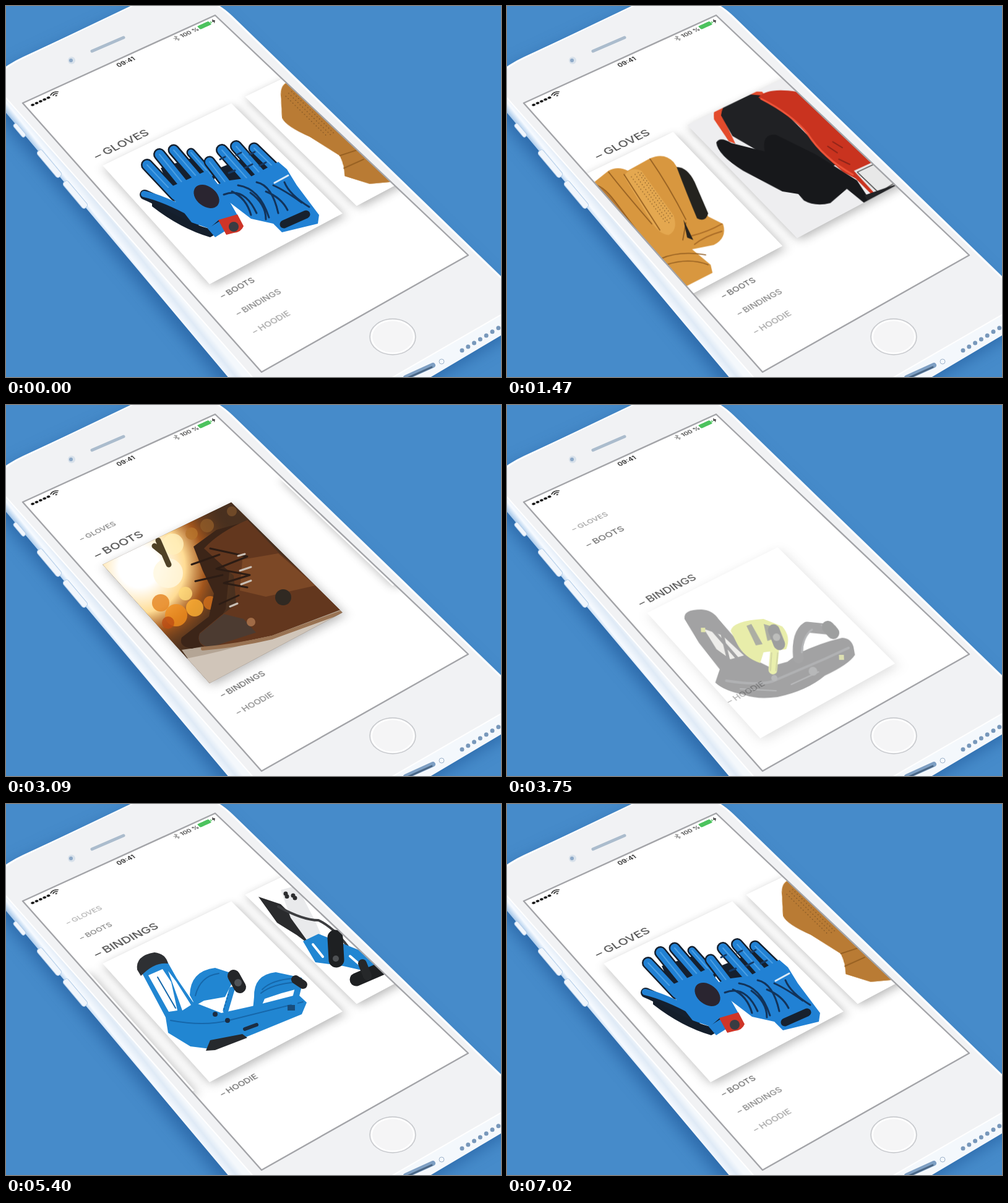
Recreate the animation shown at these times as an HTML page. Size 800 by 600 pixels, loop 7050 ms.

```html
<!DOCTYPE html>
<html lang="en">
<head>
<meta charset="utf-8">
<title>Winter gear carousel</title>
<style>
html, body { margin: 0; width: 100%; height: 100%; overflow: hidden; background: #468bca; }
svg, div { position: absolute; left: 0; top: 0; }
svg { width: 800px; height: 600px; overflow: visible; transform-origin: 0 0; }
#stage, #screen { width: 800px; height: 600px; overflow: hidden; }
#screen { background: #fff; clip-path: polygon(27px 157px, 338px 15px, 747px 403px, 413px 592px); }
.card { width: 243px; height: 297px; transform-origin: 0 0; box-shadow: 0 6px 17px rgba(0,0,0,.29); }
text { font-family: Inter, Roboto, sans-serif; font-weight: 500; }
</style>
</head>
<body>
<div id="stage">
  <svg>
    <defs>
      <linearGradient id="side" gradientUnits="userSpaceOnUse" x1="163" y1="375" x2="188" y2="355">
        <stop offset="0" stop-color="#a9c9ea"/><stop offset=".3" stop-color="#f6faff"/>
        <stop offset=".7" stop-color="#dfeaf6"/><stop offset="1" stop-color="#f4f8fc"/>
      </linearGradient>
    </defs>
    <path d="M-20 112Q6 92 28 82L214 -4H338Q352 2 372 22L830 466V515L680 604H362L-20 149Z" fill="url(#side)" style="filter:drop-shadow(-8px 12px 12px #1d559699)"/>
    <g fill="#f1f6fc" stroke="#b4cde8">
      <rect x="-13" y="-3.5" width="26" height="7" rx="3" transform="translate(22 201)rotate(50)"/>
      <rect x="-27" y="-5" width="54" height="10" rx="4" transform="translate(70 255)rotate(50)"/>
      <rect x="-27" y="-5" width="54" height="10" rx="4" transform="translate(112 305)rotate(50)"/>
    </g>
    <path d="M-20 116Q6 94 28 84L212 -4H336Q350 3 370 23L830 469V482L612 608H405L-20 126Z" fill="#f1f2f4" stroke="#fff" stroke-width="2"/>
    <path d="M139 73L190 51" stroke="#abbccd" stroke-width="5" stroke-linecap="round"/>
    <circle cx="106" cy="88" r="6" fill="#d8e1ea"/><circle cx="105" cy="88" r="3" fill="#8da9c8"/>
    <ellipse cx="625" cy="535" rx="37" ry="29" fill="#f5f5f6" stroke="#c5c7cb" stroke-width="1.5"/>
    <ellipse cx="625" cy="535" rx="34" ry="26.5" fill="none" stroke="#fff" stroke-width="2"/>
    <path d="M646 601L690 581" stroke="#7e9fc3" stroke-width="8" stroke-linecap="round"/>
    <path d="M650 601L688 584" stroke="#4a6684" stroke-width="3" stroke-linecap="round"/>
    <circle cx="704" cy="575" r="4" fill="none" stroke="#9fb4cb"/>
    <path d="M737 557L802 517" stroke="#7898bb" stroke-width="7" stroke-linecap="round" stroke-dasharray="0 11.5"/>
  </svg>
  <div id="screen"></div>
  <svg><path d="M27 157L338 15L747 403L413 592Z" fill="none" stroke="#a3a4a8" stroke-width="2.4" stroke-linejoin="round"/></svg>
</div>
<script>
const LOOP = 7050, LEFT = 31, TOP = 195, CARD_W = 243, CARD_H = 297, PITCH = 270;
const MIDDLE = TOP + CARD_H / 2;
const screen = document.getElementById('screen');

// Perspective from the flat 375 x 667 screen to the stage.
const plane = new DOMMatrix([
  329.54, -141.18, 0, .05486, 329.81, 354.46, 0, -.13605, 0, 0, 1, 0, 27, 157, 0, 1
]).scale(1 / 375, 1 / 667);
const flat = plane.inverse();
const project = (x, y) => {
  const p = plane.transformPoint(new DOMPoint(x, y));
  return `${p.x / p.w}px ${p.y / p.w}px`;
};

const fill = (c, d) => `<path fill="${c}" d="${d}"/>`;
const line = (c, w, d, more = '') =>
  `<path fill="none" stroke="${c}" stroke-width="${w}" stroke-linecap="round" stroke-linejoin="round" d="${d}" ${more}/>`;
const dot = (c, x, y, r, more = '') => `<circle fill="${c}" cx="${x}" cy="${y}" r="${r}" ${more}/>`;
const finger = (w, d) => line('#15202f', w + 5, d) + line('#2181d4', w, d) + line('#4a9fe4', 2, d);

const blueGloves =
  line('#15202f', 16, 'M224 305Q255 318 305 350') + line('#2181d4', 10, 'M223 304Q255 311 305 338') +
  fill('#15202f', 'M250 262L300 246L340 270L330 300L270 306Z') +
  finger(15, 'M228 257L274 306') + finger(15, 'M248 240L294 297') +
  finger(14, 'M271 233L315 284') + finger(10, 'M299 237L330 272') +
  fill('#2181d4', 'M258 296L290 282L325 266L352 300L375 340L340 364L300 350Z') +
  fill('#141e2b', 'M236 316Q290 350 328 360L344 346L352 362L330 374Q282 360 236 324Z') +
  '<ellipse cx="324" cy="308" rx="23" ry="16" transform="rotate(38 324 308)" fill="#2a2530"/>' +
  fill('#2181d4', 'M326 360L345 348L354 364L338 374Z') +
  fill('#cf3528', 'M343 346L374 337L384 356Q380 366 368 367L356 370Z') + dot('#3a3c42', 368, 357, 8) +
  fill('#15202f', 'M345 262L410 235L445 262L420 290L360 300Z') +
  finger(14, 'M329 252L366 300') + finger(15, 'M349 233L394 284') +
  finger(15, 'M372 227L417 278') + finger(14, 'M401 230L440 268') +
  fill('#2181d4', 'M330 292L362 282L392 278L440 252L454 264L470 290L506 338L504 352L446 366L432 352L396 344L362 318Z') +
  line('#12335a', 3, 'M352 305Q385 292 405 335M375 290Q410 295 425 342M405 285Q430 290 440 335M432 290Q450 298 478 318M395 302Q420 320 420 345M450 285Q458 305 490 325M365 300Q388 310 396 338M420 300Q445 310 455 330') +
  line('#143a66', 3, 'M346 248L354 244M372 241L380 237M394 240L402 236M386 262L398 256M410 258L420 253M360 270L370 266') +
  line('#17212e', 13, 'M449 353L485 337') + line('#dceaf7', 3, 'M434 286L456 274');

const tanGloves =
  fill('#d8973f', 'M126 314Q126 290 140 286L165 266Q180 258 196 266L232 246Q255 236 270 252L292 285L326 340L350 352Q357 375 335 386L300 393L330 418L333 431L292 452L250 456L212 443Q214 425 208 409L165 378L124 346Z') +
  fill('#b97b34', 'M126 314Q126 292 138 288Q155 288 175 315L235 395L292 452L250 456L212 443Q214 425 208 409L165 378Q128 360 124 346Z') +
  fill('#e4a850', 'M190 275Q200 258 218 266L270 338Q278 362 262 370Q245 368 232 345Z') +
  fill('#24231f', 'M275 260Q292 260 304 284L326 335Q322 350 308 343Q292 305 275 260Z') +
  line('#8f5a1e', 1.6, 'M165 268Q190 300 235 352M138 288Q155 288 175 315L235 395M232 247Q262 290 290 345M190 272L248 362M290 350L285 378M250 408Q280 395 322 402M258 418Q295 406 326 418M208 409L235 400M212 430L245 415') +
  line('#69451d', 1.5, 'M202 276L258 350M208 272L264 352M213 269L267 347M218 270L268 340M134 310L190 375M139 305L198 375M144 302L204 373', 'stroke-dasharray="0 5"') +
  line('#a86a25', 2, 'M300 371Q325 365 348 352M304 385Q320 372 348 364') +
  fill('#27241f', 'M286 345L302 378L292 374Z');

const redMitts =
  fill('#e34b2c', 'M217 250Q215 210 262 206L292 207L300 218Q240 208 232 250L248 288L238 284Z') +
  fill('#202124', 'M228 244Q232 214 272 211L302 214L400 320L360 340L290 304L244 276Z') +
  fill('#17181b', 'M219 286Q225 276 242 287L292 300Q288 272 310 274L370 305L430 345L452 382L444 384L414 358L388 380Q365 386 348 376L340 366L316 362L258 330Q220 305 219 286Z') +
  fill('#c9331f', 'M286 216Q300 200 345 207L392 222Q422 240 440 272L462 300L504 346L458 374L428 342L410 332Q375 302 355 268Q335 245 286 216Z') +
  line('#f0553a', 3, 'M290 218Q335 242 358 272Q380 310 424 336') +
  line('#8d2419', 2, 'M388 292L402 302M396 285L410 294M404 312L420 320') +
  fill('#e8e8e8', 'M426 330L478 306L503 343L460 370Z') +
  line('#303030', 1.2, 'M431 332L476 311L498 342L462 364Z') +
  fill('#222326', 'M440 368L503 346L504 353L448 384Z');

const blackGlove =
  fill('#202124', 'M408 134L446 112L590 245L610 262L560 266L520 232L465 184Z') +
  fill('#141518', 'M424 180Q445 174 485 186L525 212L596 255Q590 268 560 266L532 246Q470 230 448 204Z') +
  line('#46474c', 3, 'M425 138L480 190M532 238L558 226M538 250L574 242');

const boots =
  fill('#49301f', 'M140 260L364 150L550 340L329 460Z') +
  fill('url(#glow)', 'M140 260L364 150L550 340L329 460Z') +
  [[270, 225, 17, '#fff0bd'], [262, 272, 24, '#fff8df'], [300, 208, 10, '#b7742c'], [325, 195, 11, '#8d5a28'], [250, 320, 14, '#e58320'], [275, 340, 18, '#f08e1d'], [305, 328, 14, '#ffb234'], [290, 305, 11, '#ffd979'], [262, 352, 10, '#bd4c13'], [330, 320, 11, '#d4701a'], [365, 172, 8, '#79502b']]
    .map(([x, y, r, c]) => dot(c, x, y, r, 'opacity=".8"')).join('') +
  line('#4f4126', 9, 'M246 219L263 258M240 228L255 240') +
  fill('#b4a595', 'M284 396L340 388L548 320V345L329 460Z') +
  fill('#d0c5b9', 'M292 410Q400 390 548 330L500 372L329 450Z') +
  fill('#3c2518', 'M303 229L340 202L383 190L362 260L355 330L322 388L300 394Q278 390 284 376L328 342L336 305L318 268Z') +
  fill('#63371e', 'M320 232Q345 205 390 186L440 238L516 302L541 331L430 373L330 394Q306 388 313 369L348 340L372 322L368 276Z') +
  fill('#4c3b31', 'M313 370L352 338L384 346L404 368L330 392Q307 388 313 370Z') +
  fill('#7c4826', 'M382 250L440 240L500 292L420 310L378 300Z') +
  line('#997353', 6, 'M318 394Q370 390 430 376L540 336') +
  line('#2c1c14', 3, 'M330 232L390 245L340 265L394 275L352 288L390 295M300 258L345 242M306 285L350 275M345 322L376 308') +
  line('#c9bfb5', 3, 'M375 244L386 241M378 268L396 262M380 290L396 284M362 326L374 321') +
  dot('#302922', 448, 311, 13) + dot('#a06b46', 396, 351, 7);

const blackBinding =
  fill('#222324', 'M176 284Q174 269 204 269Q222 270 231 284L264 323L290 350L310 360L340 352L360 338Q395 322 430 314Q444 314 448 328L450 341Q440 356 400 374Q370 398 322 408Q290 412 270 405Q235 398 222 385L230 364L198 322Z') +
  fill('#d6d5ce', 'M207 300L236 310L270 342L248 348L226 332Z') +
  line('#222324', 5, 'M216 296L262 350M236 308L245 350') +
  fill('#c8d536', 'M250 303Q254 287 304 284L334 296Q348 312 339 332L302 337L296 354Q270 345 260 324Z') +
  fill('#3b3f24', 'M276 295L284 292L301 324L290 326ZM304 292L324 298L329 312L309 319Z') +
  line('#cbd83c', 14, 'M320 334L316 365') + line('#929d24', 2, 'M315 338L312 366M325 338L321 366') +
  line('#17181a', 19, 'M320 302L328 324') + dot('#60635e', 324, 313, 6) +
  line('#292a2c', 17, 'M358 346Q356 308 374 297L414 301') + line('#505257', 3, 'M364 337Q367 311 382 301M398 294L416 307') +
  line('#1a1b1c', 20, 'M408 297L416 306') +
  line('#44464a', 4, 'M240 382Q290 390 315 383L402 347L440 330') +
  line('#55575b', 2, 'M262 395L320 398M345 388L390 368') +
  dot('#55575a', 318, 378, 5) + dot('#55575a', 381, 367, 7) +
  '<rect x="424" y="341" width="8" height="8" fill="#aeb647"/><rect x="202" y="298" width="7" height="7" fill="#b9c43b"/>';

const blueBinding =
  fill('#2186d2', 'M218 270L258 250L276 282L302 320L348 338L402 326L472 308L486 321L478 340L400 372L338 397L298 392L262 370L258 345Z') +
  fill('#2e3033', 'M212 268Q209 245 240 240Q258 242 262 258Q240 255 218 278Z') +
  fill('#fff', 'M230 277L253 267L267 288L277 334L263 336ZM262 270L275 287L299 325L285 334Z') +
  fill('#2186d2', 'M297 309Q298 270 338 265L372 276L354 312L320 318L306 326Z') +
  line('#1667aa', 2, 'M306 310Q314 278 344 274M266 350Q320 360 360 350L480 320M245 280L274 330') +
  line('#2186d2', 9, 'M365 300L355 334') + line('#1667aa', 2, 'M359 308L352 332', 'stroke-dasharray="1 5"') +
  line('#242629', 20, 'M368 278L378 296') + dot('#505459', 375, 289, 6) +
  fill('#2186d2', 'M401 312Q400 276 436 272L478 281L482 296L445 306L418 315L410 334L399 332Z') +
  line('#1667aa', 2, 'M412 306Q430 291 470 288M414 300Q430 284 466 282') +
  line('#2186d2', 10, 'M472 298L466 322') + line('#242629', 14, 'M468 284L480 292') +
  fill('#26292d', 'M323 399L330 382L382 372L390 378L338 398Z') +
  line('#1c2d42', 6, 'M386 364L405 357') + dot('#1c2d42', 338, 340, 4) + dot('#1c2d42', 358, 350, 4) +
  '<rect x="455" y="325" width="12" height="9" fill="#184c7a"/>';

const whiteBinding =
  fill('#2a2b2d', 'M408 150L444 162L472 190L494 230L470 212L438 192Z') +
  fill('#e9eaec', 'M444 139L470 132L500 190L512 218L486 220L460 184Z') +
  line('#2b2c2e', 7, 'M452 145L456 154M464 148L470 156', 'stroke-dasharray="0 5"') +
  line('#3c3d40', 4, 'M440 166Q480 188 505 188Q530 200 552 230') +
  fill('#2186d2', 'M480 222L505 210L580 240L620 262L606 276L545 262L500 256Z') +
  line('#fff', 4, 'M496 227L512 247M556 246L572 260') +
  line('#1e2022', 25, 'M532 216L534 252') + dot('#4e5154', 533, 250, 5) +
  line('#1e2022', 21, 'M566 284L610 265') + line('#26282a', 14, 'M576 258L584 278');

// Each card: artwork, background, and the screen x at which the artwork is drawn.
const sections = [
  ['GLOVES', [[blueGloves, '#fff', 31], [tanGloves, '#fff', -82], [redMitts, '#eeeef0', 36], [blackGlove, '#eeeef0', 307]]],
  ['BOOTS', [[boots, '#49301f', 31], ['', '#fff', 301]]],
  ['BINDINGS', [[blackBinding, '#fff', -9], [blueBinding, '#fff', 31], [whiteBinding, '#fff', 301]]],
  ['HOODIE', []]
];

function add(tag, html = '') {
  screen.insertAdjacentHTML('beforeend', `<${tag}>${html}</${tag}>`);
  return screen.lastElementChild;
}

const glow = '<defs><radialGradient id="glow" gradientUnits="userSpaceOnUse" cx="215" cy="262" r="165"><stop offset=".2" stop-color="#fff"/><stop offset=".45" stop-color="#ffdc94"/><stop offset=".65" stop-color="#b85f1c" stop-opacity=".8"/><stop offset="1" stop-color="#3a291e" stop-opacity="0"/></radialGradient></defs>';
const status = '<g font-size="12" text-anchor="middle" fill="#222">' +
  [0, 1, 2, 3, 4].map(i => dot('#111', 11 + i * 7.3, 13, 2.8)).join('') +
  line('#222', 1.8, 'M46 10Q53 4 60 10M49 13Q53 9 57 13') + dot('#222', 53, 16, 1.6) +
  '<text x="188" y="17.5" font-size="12.5" style="font-weight:600">09:41</text><text x="315" y="16">100 %</text>' +
  line('#888', 1.2, 'M285 9L292 15L289 18V5L292 8L285 14') +
  '<rect x="334" y="6" width="23" height="10" rx="2" fill="#4cc35e"/><rect x="358" y="9" width="2" height="4" fill="#4cc35e"/>' +
  fill('#222', 'M366 5L361 12H364L362 17L368 10H365Z') + '</g>';
const overlay = add('svg', glow + status + sections.map(s => `<text class="label" x="${LEFT}">– ${s[0]}</text>`).join(''));
overlay.style.transform = plane;
const labels = overlay.querySelectorAll('.label');

const cards = sections.flatMap(([, list], section) => list.map(([art, color, drawnAt], index) => {
  const box = add('div'), image = add('svg', art);
  box.className = 'card';
  box.style.background = color;
  return { section, index, drawnAt, box, image };
}));

// Steps are [start, end, target]; each eases out from the value before it.
const track = (t, steps) => steps.reduce((v, [start, end, to]) => {
  const left = 1 - Math.min(1, Math.max(0, (t - start) / (end - start)));
  return v + (to - v) * (1 - left ** 3);
}, 0);

// Pictures grow inside their frame as the card leaves the centre.
const zoomAt = x => 1 + .16 * Math.min(1, Math.abs(x - LEFT) / PITCH);

function labelY(d) {
  if (d < -1) return 132 + 42 * (d + 1);
  if (d < 0) return 179 + 47 * d;
  return d < 1 ? 179 + 347 * d : 526 + 40.5 * (d - 1);
}

function draw(now) {
  const t = now % LOOP;
  const current = track(t, [[2250, 3000, 1], [3550, 4250, 2], [5800, 6700, 0]]);
  const spread = 220 * track(t, [[2250, 2600, 1], [2900, 3500, 0], [3550, 3800, 1], [3950, 4400, 0], [5800, 6100, 1], [6300, 6950, 0]]);
  const scroll = [
    track(t, [[300, 1150, 1], [1323, 2209, 2], [3500, 3501, 0]]), 0,
    track(t, [[4425, 5280, 1]])
  ];
  labels.forEach((label, i) => {
    const d = i - current;
    label.setAttribute('y', labelY(d));
    label.setAttribute('font-size', 13.7 + 7 * Math.max(0, 1 - Math.abs(d)));
    label.setAttribute('fill-opacity', d > 0 ? .7 - .11 * d : .68 + .18 * d);
  });
  for (const { section, index, drawnAt, box, image } of cards) {
    const d = section - current, s = scroll[section];
    const x = LEFT + (index - s) * PITCH + spread * Math.sign(index - Math.round(s));
    const dy = labelY(d) - 179;
    box.style.opacity = image.style.opacity = Math.max(0, 1 - 1.6 * Math.abs(d));
    box.style.transform = plane.translate(x, TOP + dy);

    const zoom = zoomAt(x) / zoomAt(drawnAt), center = drawnAt + CARD_W / 2;
    image.style.transform = plane.translate(x + CARD_W / 2, MIDDLE + dy)
      .scale(zoom, zoom).translate(-center, -MIDDLE).multiply(flat);
    const w = CARD_W / 2 / zoom, h = CARD_H / 2 / zoom;
    const corners = [[-w, -h], [w, -h], [w, h], [-w, h]].map(([a, b]) => project(center + a, MIDDLE + b));
    image.style.clipPath = `polygon(${corners})`;
  }
  requestAnimationFrame(draw);
}
requestAnimationFrame(draw);
</script>
</body>
</html>
```
